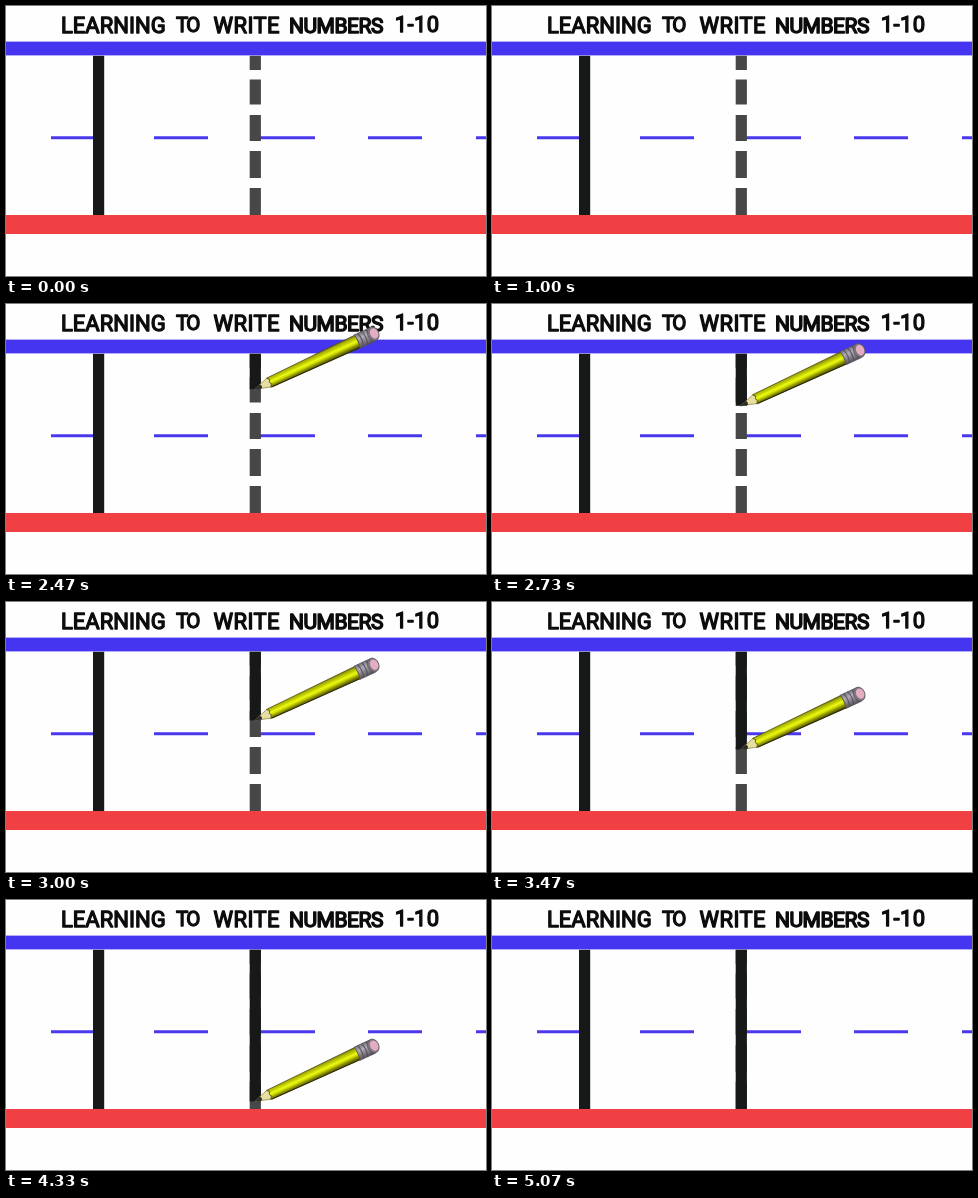
Animation, 480 px wide and 270 px high, one loop 5.14 s. Source, as an HTML page:

```html
<!DOCTYPE html>
<html lang="en">
<head>
<meta charset="utf-8">
<title>Writing numbers</title>
<style>
  html, body { margin: 0; width: 100%; height: 100%; overflow: hidden; background: #fefefe; }
  svg { display: block; width: 100vw; height: 100vh; }
  text {
    font: 400 22px Roboto, "Open Sans", sans-serif;
    fill: #0c0c0c; stroke: #0c0c0c; stroke-width: 1.3px; stroke-linejoin: round;
  }
</style>
</head>
<body>
<svg viewBox="0 0 480 270">
  <defs>
    <linearGradient id="wood" x1="0" y1="0" x2="0" y2="1">
      <stop offset="0" stop-color="#666a10"/>
      <stop offset=".16" stop-color="#a9b004"/>
      <stop offset=".34" stop-color="#ccd800"/>
      <stop offset=".46" stop-color="#e8fa18"/>
      <stop offset=".6" stop-color="#d2de00"/>
      <stop offset=".76" stop-color="#8f9400"/>
      <stop offset="1" stop-color="#414308"/>
    </linearGradient>
    <linearGradient id="metal" x1="0" y1="0" x2="0" y2="1">
      <stop offset="0" stop-color="#77717c"/>
      <stop offset=".35" stop-color="#b0abb5"/>
      <stop offset="1" stop-color="#56515b"/>
    </linearGradient>
  </defs>

  <rect width="480" height="270" fill="#fefefe"/>
  <g id="title">
    <text x="55" y="26.7">LEARNING</text>
    <text x="170" y="26.4" font-size="20" letter-spacing="-1.8" style="font-size:20.5px">TO</text>
    <text x="207.5" y="26.7" letter-spacing=".4">WRITE</text>
    <text x="283" y="27.2" letter-spacing="-.5" style="font-size:21px; stroke-width:1.5px">NUMBERS</text>
    <text x="388.8" y="26.3" letter-spacing=".4">1-10</text>
  </g>
  <rect y="35.600" width="480" height="13.800" fill="#4534f0"/>
  <path d="M45 131.7H88M148 131.7H202M254 131.7H309M362 131.7H416M470 131.7H480"
        stroke="#4a38ee" stroke-width="3"/>
  <rect y="209" width="480" height="19" fill="#f04043"/>
  <rect x="87" y="49.800" width="11.200" height="159.200" fill="#171918"/>
  <path d="M249.3 49.800V64M249.3 73.5V98.5M249.3 109V135M249.3 145V172M249.3 182V209"
        stroke="#474747" stroke-width="11.2"/>
  <rect id="ink" x="243.700" y="49.800" width="11.200" height="0" fill="#171918"/>

  <g id="pencil" visibility="hidden">
    <path d="M0 0L16 -4.8L18 0L16 5Z" fill="#e6dfa0" stroke="#7f7a40" stroke-width=".6"/>
    <path d="M-.8 0L7 -2.2L8 .3L7 2.4Z" fill="#2c2c2a"/>
    <path d="M15.5 -4.9L114 -6.6V6.8L15.5 5.2L18 2.5L16.3 0L18 -2.5Z"
          fill="url(#wood)" stroke="#4c4f10" stroke-width=".7"/>
    <path d="M17 5.2L114 6.8" stroke="#2e2d08" stroke-width="1"/>
    <path d="M113 -7H130Q133 0 130 7.4H113Q115.5 0 113 -7Z"
          fill="url(#metal)" stroke="#57525c" stroke-width=".7"/>
    <path d="M117 -7Q119.5 0 117 7.3M121.5 -7Q124 0 121.5 7.3M126 -7Q128.5 0 126 7.3"
          fill="none" stroke="#544e59" stroke-width="1"/>
    <ellipse cx="131" cy="0" rx="5.6" ry="7.2" fill="#7d7580" stroke="#5a525e" stroke-width=".7"/>
    <ellipse cx="132" cy="0" rx="4" ry="5.4" fill="#e4adc0"/>
  </g>
</svg>
<script>
  const LOOP = 5140, FPS = 15;
  const SHOW = 19, START = 29, HIDE = 68;   // in steps of 1/15 s
  const TOP = 52, SPEED = 4.15, BOTTOM = 209;
  const ink = document.getElementById("ink");
  const pencil = document.getElementById("pencil");

  function draw(ms) {
    const step = Math.floor((ms % LOOP + 4) * FPS / 1000);
    const y = Math.min(BOTTOM, TOP + SPEED * Math.max(0, step - START));
    ink.setAttribute("height", step > START ? y - 49.8 : 0);
    pencil.setAttribute("visibility", step >= SHOW && step < HIDE ? "visible" : "hidden");
    pencil.setAttribute("transform", `translate(248.5 ${y}) rotate(-25)`);
  }

  function tick() {
    draw(performance.now());
    requestAnimationFrame(tick);
  }
  tick();
</script>
</body>
</html>
```
